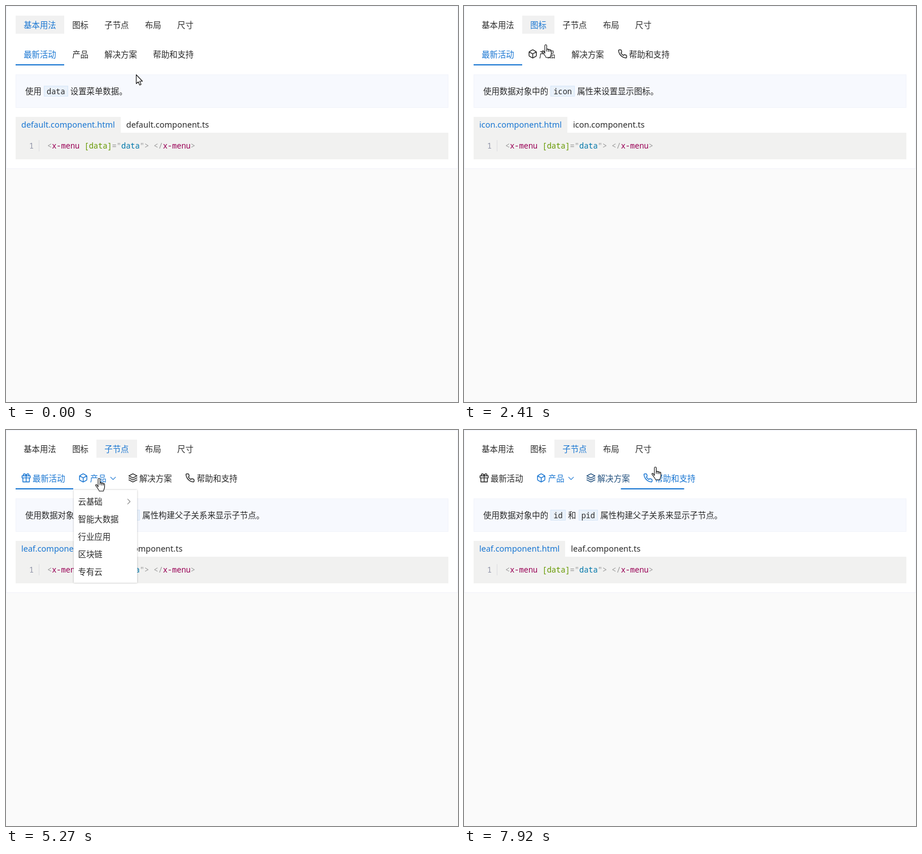
An HTML page that plays this animation: 800x700 px, repeating every 7990 ms.

```html
<!DOCTYPE html>
<html lang="zh-CN">
<head>
<meta charset="utf-8">
<title>Menu</title>
<style>
html, body { margin: 0; width: 100%; height: 100%; overflow: hidden; background: #fafafa; }
body { position: relative; color: #2a2a2a; font: 14.4px 'Noto Sans CJK SC', 'Noto Sans CJK', sans-serif; white-space: pre; cursor: default; }
svg { fill: none; stroke: currentColor; stroke-linecap: round; stroke-linejoin: round; }
.card { position: absolute; left: 0; top: 0; width: 798px; height: 286px; background: #fff; border: 1px solid #f1f2f9; }
.tabs, .menu { position: absolute; left: 17px; display: flex; }
.tabs { top: 17px; }
.tabs div { position: relative; height: 32px; line-height: 31px; padding: 0 14.2px; }
.tabs i { position: absolute; inset: 0; background: #f1f1f1; }
.tabs span { position: relative; }
.menu { top: 66px; }
.item { position: relative; height: 39px; line-height: 37px; padding: 0 14.2px; }
.item.icon { padding-left: 30px; }
.item.more { padding-right: 28.4px; }
.item svg { position: absolute; left: 9.7px; top: 9.6px; width: 17.28px; height: 17.28px; stroke-width: 2; }
.item svg.chev { left: auto; right: 10px; top: 13px; width: 13px; height: 13px; }
.bar { position: absolute; left: 0; top: 103px; height: 2px; background: #1976d2; }
.note { position: absolute; left: 17px; top: 121px; width: 748px; height: 57px; padding-left: 16px; display: flex; align-items: center; background: #f7f9fe; border: 1px solid #f1f3fb; }
.note span { margin-top: -2px; }
.note code { margin: 0 4.3px; padding: 0 4px; height: 17px; line-height: 18px; background: #e9f1fb; border: 1px solid #d6e6f7; }
code, .code { font-family: 'Noto Sans Mono', monospace; font-size: 13.5px; }
.files { position: absolute; left: 17px; top: 196px; display: flex; font: 14.5px 'Noto Sans', sans-serif; }
.files div { height: 28px; line-height: 27px; padding: 0 10px; }
.files div:first-child { background: #f1f1f0; color: #1976d2; }
.code { position: absolute; left: 17px; top: 224px; width: 766px; height: 47px; background: #f1f1f0; color: #999; font-size: 13.65px; line-height: 20px; }
.code span { position: absolute; left: 56px; top: 13px; }
.code u { position: absolute; left: 24px; top: 13px; width: 17px; text-decoration: none; color: #8f93a8; border-right: 1px solid #dcdce0; }
.code b { font-weight: 400; color: #905; }
.code em { font-style: normal; color: #690; }
.code q { quotes: none; color: #07a; }
.pop { position: absolute; width: 112px; padding: 5px 0; background: #fff; box-shadow: 0 0 3px rgba(0,0,0,.25); }
.pop div { position: relative; height: 31px; line-height: 29px; padding-left: 7.5px; }
.pop svg { position: absolute; right: 8px; top: 8.5px; width: 13px; height: 13px; color: #888; stroke-width: 2; }
#drop { left: 120px; top: 106px; height: 154px; }
#sub { left: 233px; top: 112px; }
#cursor { position: absolute; left: 0; top: 0; width: 24px; height: 26px; overflow: visible; }
#cursor path { stroke: #111; stroke-width: 1.1; }
.solid { fill: #fff; }
</style>
</head>
<body>
<div class="card"></div>
<div class="tabs" id="tabs"></div>
<div id="pages"></div>
<div class="bar" id="bar"></div>
<div class="pop" id="drop"></div>
<div class="pop" id="sub"></div>
<svg id="cursor">
  <g id="arrow"><path class="solid" d="M.5.5V16.3L4 13l2.6 5.8 2.5-1.1L6.6 12h4.9z"/></g>
  <g id="hand" transform="translate(-6 0)">
    <path class="solid" d="M5 15.5V2.2a1.7 1.7 0 0 1 3.4 0V9a1.6 1.6 0 0 1 3 .4 1.5 1.5 0 0 1 2.8.7 1.3 1.3 0 0 1 2.3 1V16c0 2.5-1.5 4-2 7H7c0-2-2.5-4-3.5-6L.8 13.4c-.7-1.4.8-2.4 2-1.4z"/>
    <path d="M8.4 9v3M11.4 9.4v3M14.2 10.1v2.5"/>
  </g>
</svg>
<script>
const LOOP = 7990, FADE = 200, SLIDE = 300;
const BEFORE = -1000, AFTER = 1e5;
const $ = id => document.getElementById(id);

const ICONS = {
  gift: 'M20 12v10H4V12M2 7h20v5H2zM12 22V7M12 7H7.5a2.5 2.5 0 0 1 0-5C11 2 12 7 12 7zM12 7h4.5a2.5 2.5 0 0 0 0-5C13 2 12 7 12 7z',
  box: 'M21 16V8a2 2 0 0 0-1-1.73l-7-4a2 2 0 0 0-2 0l-7 4A2 2 0 0 0 3 8v8a2 2 0 0 0 1 1.73l7 4a2 2 0 0 0 2 0l7-4A2 2 0 0 0 21 16zM3.27 6.96L12 12l8.73-5.04M12 22V12',
  layers: 'M12 2L2 7l10 5 10-5zM2 17l10 5 10-5M2 12l10 5 10-5',
  phone: 'M22 16.92v3a2 2 0 0 1-2.18 2 19.79 19.79 0 0 1-8.63-3.07 19.5 19.5 0 0 1-6-6 19.79 19.79 0 0 1-3.07-8.67A2 2 0 0 1 4.11 2h3a2 2 0 0 1 2 1.72 12.84 12.84 0 0 0 .7 2.81 2 2 0 0 1-.45 2.11L8.09 9.91a16 16 0 0 0 6 6l1.27-1.27a2 2 0 0 1 2.11-.45 12.84 12.84 0 0 0 2.81.7A2 2 0 0 1 22 16.92z',
  down: 'M4 8l8 8 8-8',
  right: 'M8 4l8 8-8 8'
};
const svg = (name, cls = '') => `<svg class="${cls}" viewBox="0 0 24 24"><path d="${ICONS[name]}"/></svg>`;

// lit: when the text is blue; on: when the tab is selected
const TABS = [
  { text: '基本用法', lit: [BEFORE, 2000], on: [BEFORE, 2000] },
  { text: '图标', lit: [1800, 4530], on: [2000, 4530] },
  { text: '子节点', lit: [4300, AFTER], on: [4530, AFTER] },
  { text: '布局' },
  { text: '尺寸' }
];

const LABELS = ['最新活动', '产品', '解决方案', '帮助和支持'];
// clicks: [time, item] moves the underline
const PAGES = [
  {
    from: 0, to: 2000, name: 'default', icons: [],
    note: '使用`data`设置菜单数据。',
    lit: [[BEFORE, 420], [1400, AFTER], [200, 900], [650, 1552]],
    clicks: [[420, 2], [900, 3], [1552, 1]]
  },
  {
    from: 2000, to: 4530, name: 'icon', icons: [, 'box', , 'phone'],
    note: '使用数据对象中的`icon`属性来设置显示图标。',
    lit: [[BEFORE, 3010], [2430, 3400], [3180, 3890], [3600, AFTER]],
    clicks: [[3010, 1], [3400, 2], [3890, 3]]
  },
  {
    from: 4530, to: LOOP, name: 'leaf', icons: ['gift', 'box', 'layers', 'phone'], more: 1,
    note: '使用数据对象中的`id`和`pid`属性构建父子关系来显示子节点。',
    lit: [[BEFORE, 7380], [4950, AFTER], [7230, 7821], [7550, AFTER]],
    clicks: [[7380, 2], [7821, 3]]
  }
];

// time, x, y of the pointer tip
const PATH = [
  [0, 230, 121], [70, 230, 121], [400, 205, 92], [480, 205, 92], [850, 290, 90], [930, 290, 90],
  [1450, 136, 88], [1540, 135, 86], [1700, 129, 54], [1900, 132, 36], [2030, 132, 36],
  [2410, 144, 68], [2630, 144, 68], [2870, 131, 90], [3040, 131, 90], [3360, 215, 90], [3430, 215, 90],
  [3800, 320, 88], [3900, 320, 88], [4430, 194, 28], [4560, 194, 34], [4670, 194, 34],
  [5270, 164, 85], [5440, 164, 85], [5980, 200, 123], [6140, 200, 123], [6450, 285, 178],
  [6920, 285, 178], [7350, 262, 90], [7420, 262, 90], [7720, 330, 86], [7800, 330, 86],
  [7920, 338, 65], [LOOP, 338, 65]
];

const clamp = v => Math.max(0, Math.min(1, v));
const ramp = (t, [on, off], d = FADE) => clamp((t - on) / d) * (1 - clamp((t - off) / d));
const mix = (a, b, k) => a + (b - a) * k;
const tint = k => `rgb(${[25, 118, 210].map(c => Math.round(mix(42, c, k)))})`;

function add(parent, cls, html) {
  const el = document.createElement('div');
  el.className = cls;
  el.innerHTML = html;
  parent.append(el);
  return el;
}

for (const tab of TABS) tab.el = add($('tabs'), '', `<i></i><span>${tab.text}</span>`);

for (const page of PAGES) {
  page.el = add($('pages'), '', '');
  const menu = add(page.el, 'menu', '');
  let x = 17;
  page.items = LABELS.map((label, i) => {
    const icon = page.icons[i], more = page.more === i;
    const html = (icon ? svg(icon) : '') + label + (more ? svg('down', 'chev') : '');
    const el = add(menu, `item${icon ? ' icon' : ''}${more ? ' more' : ''}`, html);
    const w = label.length * 14.4 + (icon ? 30 : 14.2) + (more ? 28.4 : 14.2);
    const item = { el, x, w };
    x += w;
    return item;
  });
  add(page.el, 'note', page.note.split('`').map((s, i) => i % 2 ? `<code>${s}</code>` : `<span>${s}</span>`).join(''));
  add(page.el, 'files', ['html', 'ts'].map(ext => `<div>${page.name}.component.${ext}</div>`).join(''));
  add(page.el, 'code', '<u>1</u><span>&lt;<b>x-menu</b> <em>[data]</em>="<q>data</q>"&gt; &lt;/<b>x-menu</b>&gt;</span>');
}

['云基础', '智能大数据', '行业应用', '区块链', '专有云'].forEach((s, i) => add($('drop'), '', s + (i ? '' : svg('right'))));
const subs = ['计算', '网络', '存储', '数据库'].map(s => add($('sub'), '', s));

function pointer(t) {
  const i = Math.max(1, PATH.findIndex(p => p[0] >= t));
  const [t0, x0, y0] = PATH[i - 1], [t1, x1, y1] = PATH[i];
  const u = clamp((t - t0) / (t1 - t0)), k = u * u * (3 - 2 * u);
  return [mix(x0, x1, k), mix(y0, y1, k)];
}

function underline(page, t) {
  let { x, w } = page.items[0];
  for (const [at, i] of page.clicks) {
    const k = 1 - (1 - clamp((t - at) / SLIDE)) ** 3;
    x = mix(x, page.items[i].x, k);
    w = mix(w, page.items[i].w, k);
  }
  return [x, w];
}

function render(t) {
  for (const { el, lit, on } of TABS) {
    el.style.color = tint(lit ? ramp(t, lit) : 0);
    el.firstChild.style.opacity = on ? ramp(t, on, 120) : 0;
  }
  for (const page of PAGES) {
    const shown = t >= page.from && t < page.to;
    page.el.style.display = shown ? '' : 'none';
    if (!shown) continue;
    page.items.forEach(({ el }, i) => el.style.color = tint(ramp(t, page.lit[i])));
    const [x, w] = underline(page, t);
    $('bar').style.transform = `translateX(${x}px)`;
    $('bar').style.width = w + 'px';
  }
  $('drop').style.opacity = ramp(t, [5040, 7180], 150);
  $('sub').style.opacity = ramp(t, [5760, 7120], 150);

  const [x, y] = pointer(t);
  subs.forEach((el, i) => {
    const top = 117 + 31 * i;
    el.style.background = x > 233 && y >= top && y < top + 31 ? '#f5f7fc' : '';
  });
  const hand = y > 17 && y < 49 || y >= 64.5 && y < 105 || t > 5040 && t < 7200;
  $('hand').style.display = hand ? '' : 'none';
  $('arrow').style.display = hand ? 'none' : '';
  $('cursor').style.transform = `translate(${x}px, ${y}px)`;
}

const start = performance.now();
function tick() {
  render((performance.now() - start) % LOOP);
  requestAnimationFrame(tick);
}
tick();
</script>
</body>
</html>
```
